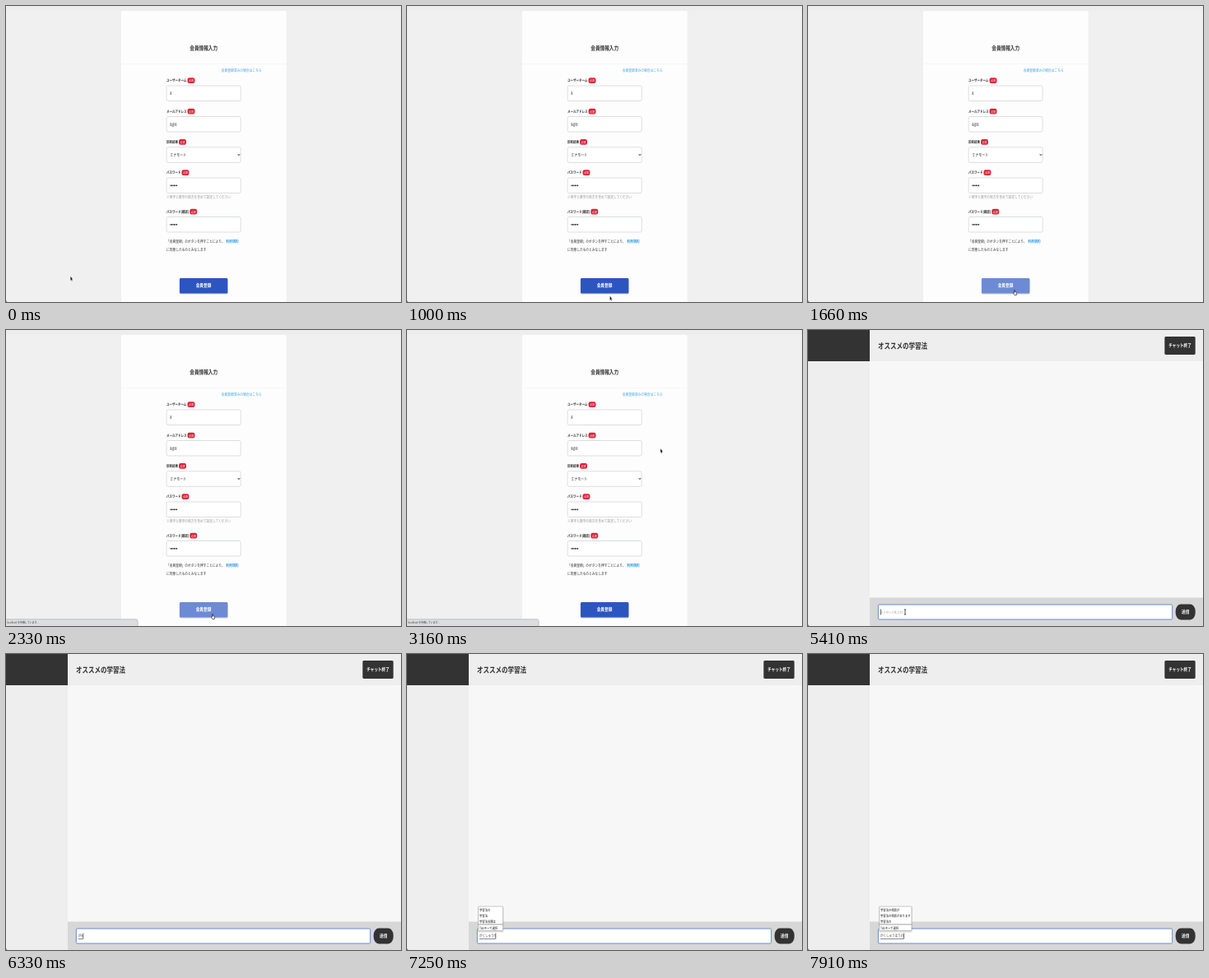
Recreate the animation shown at these times as an HTML page. Size 480 px wide and 360 px high, loop 8000 ms.

```html
<!DOCTYPE html>
<html lang="ja">
<head>
<meta charset="utf-8">
<title>会員登録とチャット</title>
<style>
html, body { margin: 0; width: 100%; height: 100%; overflow: hidden; background: #f0f0f0; }
svg { display: block; width: 100vw; height: 100vh; }
text {
  font-family: "Noto Sans CJK JP", "Noto Sans CJK", sans-serif;
  white-space: pre; text-rendering: geometricPrecision;
}
</style>
</head>
<body>
<!-- A 16:9 screen recording, squeezed onto the 4:3 stage -->
<svg id="stage" viewBox="0 0 640 360" preserveAspectRatio="none">
  <g id="form"></g>
  <g id="chat"></g>
  <path d="M0 357.5V360H2.5Q0 360 0 357.5Z" fill="#444"/>
  <g id="status"></g>
  <g id="arrow"><path d="M0 0V5.6L1.3 4.4L2.2 6.2L3.1 5.8L2.3 4H4Z" fill="#111" stroke="#fff" stroke-width=".3"/></g>
  <g id="hand"><path d="M0-.5Q.7-1.2 1.4-.5V1.8L3.6 2.3Q4.5 2.6 4.2 3.8L3.7 5.7H.7L-1.3 3.3Q-1.1 2.4 0 3Z" fill="#fff" stroke="#111" stroke-width=".7"/></g>
  <g id="beam"><path d="M-1.3-3.3Q0-3.3 0-2.4Q0-3.3 1.3-3.3M0-2.4V2.4M-1.3 3.3Q0 3.3 0 2.4Q0 3.3 1.3 3.3" fill="none" stroke="#222" stroke-width=".9"/></g>
</svg>
<script>
const LOOP = 8000;
const $ = id => document.getElementById(id);
const NS = 'http://www.w3.org/2000/svg';

function add(parent, tag, attrs, content = '') {
  const el = document.createElementNS(NS, tag);
  for (const k in attrs) el.setAttribute(k, attrs[k]);
  el.textContent = content;
  parent.append(el);
  return el;
}
const box = (g, x, y, width, height, fill, more = {}) =>
  add(g, 'rect', { x, y, width, height, fill, ...more });
// cy is the vertical middle of the line
const label = (g, x, cy, size, content, fill = '#333', more = {}) =>
  add(g, 'text', { x, y: cy + size * 0.38, 'font-size': size, fill, ...more }, content);
const BOLD = { 'font-weight': 700 };
const MEDIUM = { 'font-weight': 500 };
const MID = { 'text-anchor': 'middle', ...BOLD };
const show = (el, on) => el.setAttribute('visibility', on ? 'visible' : 'hidden');

// Registration page
const form = $('form');
box(form, 0, 0, 640, 360, '#f0f0f0');
box(form, 0, 0, 640, 5.5, '#ededed');
box(form, 186.7, 6, 267.5, 360, '#fdfdfd', { rx: 2 });
box(form, 186.7, 70, 267.5, 1, '#f6f6f6');
label(form, 320.3, 51, 7.5, '会員情報入力', '#333', MID);
label(form, 349, 78, 5.02, '会員登録済みの場合はこちら', '#42a5e8');

function field(name, nameWidth, y, value) {
  label(form, 260, y - 6.5, 4.67, name, '#333', BOLD);
  const bx = 260 + nameWidth + 1.3;
  box(form, bx, y - 9.8, 12, 6.8, '#d9263a', { rx: 3 });
  label(form, bx + 6, y - 6.4, 3.7, '必須', '#fff', { 'text-anchor': 'middle' });
  box(form, 260.2, y, 120, 18.5, '#fff', { rx: 2, stroke: '#ccd0d4', 'stroke-width': 0.8 });
  if (value) return label(form, 265.8, y + 9, 5.33, value, '#222', MEDIUM);
  for (let i = 0; i < 6; i++)
    add(form, 'circle', { cx: 266.7 + i * 2, cy: y + 9.3, r: 0.9, fill: '#222' });
}
field('ユーザーネーム', 32.7, 97, '8');
field('メールアドレス', 32.7, 134.5, '8@8');
field('診断結果', 18.7, 171.8, 'ミナモート');
field('パスワード', 23.3, 209, '');
field('パスワード(確認)', 36.4, 256.5, '');
add(form, 'path', { d: 'M375.5 180l1.8 1.8l1.8-1.8', fill: 'none', stroke: '#222', 'stroke-width': 0.9 });
label(form, 260, 232.5, 4.98, '※英字と数字の両方を含めて設定してください', '#999');
label(form, 260, 286.5, 4.98, '「会員登録」のボタンを押すことにより、', '#333', MEDIUM);
label(form, 356.4, 286.5, 5.07, '利用規約', '#2f9be6', BOLD);
label(form, 260, 296, 4.98, 'に同意したものとみなします', '#333', MEDIUM);
box(form, 281, 331.6, 78.6, 19, '#000', { rx: 2, opacity: 0.2 });
const submit = box(form, 281.3, 331, 77.8, 18.5, '', { rx: 1.5 });
label(form, 320, 340, 6.2, '会員登録', '#fff', MID);

// Chat page
const chat = $('chat');
box(chat, 0, 0, 640, 360, '#f7f7f7');
box(chat, 0, 0, 100, 360, '#eee');
box(chat, 100, 0, 540, 38, '#eee');
box(chat, 0, 0, 100, 38, '#333');
box(chat, 100, 325.5, 540, 34.5, '#d7d7d7');
label(chat, 113.3, 19, 10, 'オススメの学習法', '#333', BOLD);
box(chat, 577.8, 8, 49.8, 22, '#333', { rx: 1.8 });
label(chat, 602.7, 19, 6.13, 'チャット終了', '#fff', MID);
const input = box(chat, 113.8, 334, 476.4, 18, '#fff', { rx: 1.5, 'stroke-width': 0.9 });
box(chat, 595.6, 333.5, 32, 19, '#333', { rx: 8.5 });
label(chat, 611.6, 343, 6.2, '送信', '#fff', MID);
const TEXT_X = 117.3;
const hint = label(chat, TEXT_X, 343, 4.53, 'メッセージを入力', '#999');
const typed = label(chat, TEXT_X, 342.7, 4.67, '', '#444');
const line = box(chat, TEXT_X, 346, 0, 0.7, '#555');
const caret = box(chat, TEXT_X, 339.5, 0.9, 7, '#222');

// Input-method suggestions
const popup = add(chat, 'g', {});
const shade = box(popup, 114.6, 307.5, 40, 31, '#000', { rx: 1.5, opacity: 0.14 });
const panel = box(popup, 115.5, 307, 40, 29.5, '#fff', { rx: 1, stroke: '#a5a5a5', 'stroke-width': 0.7 });
const rows = [311.5, 318.5, 325.5].map(y => label(popup, TEXT_X, y, 4.44, '', '#222', MEDIUM));
const rule = box(popup, 115.5, 328.6, 40, 0.7, '#777');
label(popup, TEXT_X, 333, 4.44, 'Tabキーで選択', '#222', MEDIUM);

// Browser status bubble
const status = $('status');
box(status, -2, 351.8, 215.5, 10, '#dcdde0', { rx: 3, stroke: '#aaa', 'stroke-width': 0.7 });
label(status, 1.3, 356, 3.9, 'localhost を待機しています...', '#444');

const SWITCH = 3600, FOCUS = 5100;
const KEY_START = 6000, KEY_GAP = 150;
const KEYS = ['g', 'が', 'がk', 'がく', 'がくs', 'がくsh', 'がくしゅ', 'がくしゅう', 'がくしゅうh',
  'がくしゅうほ', 'がくしゅうほう', 'がくしゅうほうn', 'がくしゅうほうの'];
// [first key index, candidates]
const GUESSES = [
  [3, ['学習', '学', '学習法']],
  [7, ['学習法の', '学習法', '学習法志願は']],
  [11, ['学習法の相談が', '学習法の相談があります', '学習法の']]
];
// Pointer stops: time, x, y in stage pixels
const STOPS = [
  [0, 78.3, 328.6], [80, 78.3, 328.6], [500, 246.5, 352.6], [1050, 246.5, 352.6], [1580, 250.5, 346],
  [2500, 250.5, 346], [3000, 308, 144], [3160, 308, 144], [3800, 256, 174.3], [4000, 256, 174.3],
  [4900, 118, 343], [LOOP, 118, 343]
];
const ease = p => p * p * (3 - 2 * p);

function pointer(t) {
  const i = STOPS.findIndex(s => s[0] > t);
  const [t0, x0, y0] = STOPS[i - 1], [t1, x1, y1] = STOPS[i];
  const p = ease((t - t0) / (t1 - t0));
  return [x0 + (x1 - x0) * p, y0 + (y1 - y0) * p];
}

function draw(t) {
  const onChat = t >= SWITCH, focused = t >= FOCUS;
  form.style.display = onChat ? 'none' : '';
  chat.style.display = onChat ? '' : 'none';
  show(status, t >= 1900 && t < 4300);

  const [x, y] = pointer(t);
  const hover = !onChat && x > 211 && x < 269 && y > 331 && y < 349.5;
  const kind = onChat && y > 333 ? 'beam' : hover ? 'hand' : 'arrow';
  for (const id of ['arrow', 'hand', 'beam']) {
    show($(id), id === kind && t < KEY_START);
    $(id).setAttribute('transform', `translate(${x * 4 / 3} ${y})`);
  }
  submit.setAttribute('fill', hover ? '#6d8ad4' : '#2d55c0');
  input.setAttribute('stroke', focused ? '#4474c4' : '#ccc');

  const k = Math.min(KEYS.length - 1, Math.floor((t - KEY_START) / KEY_GAP));
  const word = k < 0 ? '' : KEYS[k];
  typed.textContent = word;
  show(hint, !word);
  let w = 0;
  for (const c of word) w += c < '~' ? 2.7 : 4.67;
  line.setAttribute('width', w);
  caret.setAttribute('x', TEXT_X + w);
  show(caret, focused && (word || (t - FOCUS) % 1000 < 500));

  const guess = GUESSES.filter(g => k >= g[0]).pop();
  popup.style.display = guess ? '' : 'none';
  if (guess) {
    const width = Math.max(40, ...guess[1].map(s => s.length * 4.44 + 3.6));
    rows.forEach((r, i) => r.textContent = guess[1][i]);
    panel.setAttribute('width', width);
    rule.setAttribute('width', width);
    shade.setAttribute('width', width + 1.8);
  }
}

const start = performance.now();
function tick() {
  draw((performance.now() - start) % LOOP);
  requestAnimationFrame(tick);
}
tick();
</script>
</body>
</html>
```
